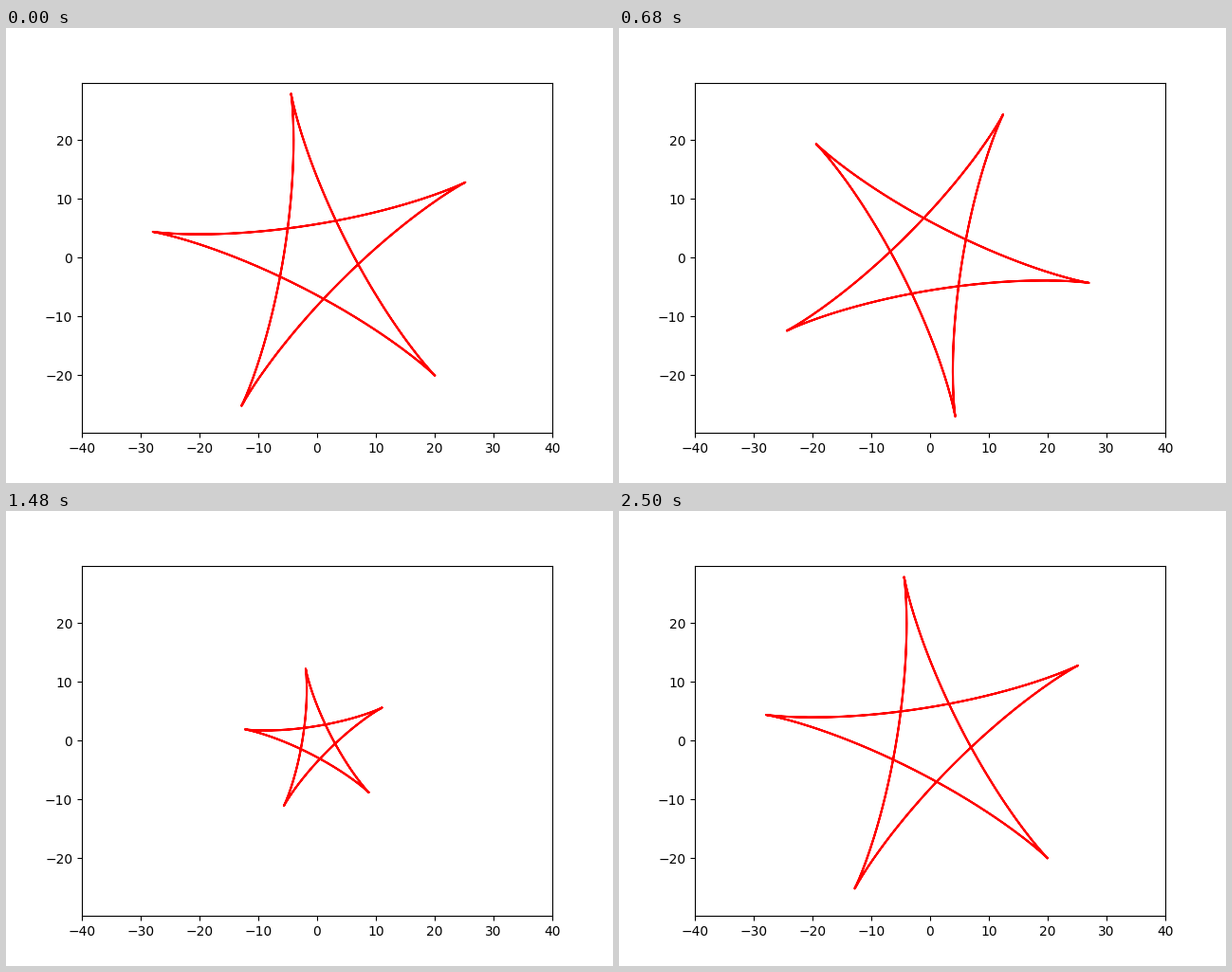
These frames come from a looping animation (640 px wide and 480 px high, 2.52 s). A matplotlib script:

```python
import numpy as np
import matplotlib.pyplot as plt
from matplotlib.animation import FuncAnimation

FRAMES = 126
INTERVAL = 20  # ms
STEP = 0.1     # phase advance per frame, in radians
RADIUS = 20 * np.sqrt(2)


def star(turns=2, points=400):
    """Five-cusped hypocycloid of unit radius, with one cusp at -45 degrees."""
    t = np.linspace(0, 2 * np.pi * turns, points * turns + 1)
    z = (3 * np.exp(2j * t) + 2 * np.exp(-3j * t)) / 5
    return z * np.exp(-0.25j * np.pi)


fig, ax = plt.subplots(figsize=(6.4, 4.8), dpi=100)

# Same scale on both axes: the height follows from the shape of the axes box.
half_width = 40
box = ax.get_window_extent()
half_height = half_width * box.height / box.width
ax.set_xlim(-half_width, half_width)
ax.set_ylim(-half_height, half_height)

shape = RADIUS * star()
line, = ax.plot([], [], color="red", linewidth=1.5)


def update(frame):
    z = shape * np.cos(STEP * frame)
    line.set_data(z.real, z.imag)
    return line,


anim = FuncAnimation(fig, update, frames=FRAMES, interval=INTERVAL,
                     init_func=lambda: update(0), repeat=True, repeat_delay=0)
plt.show()
```
